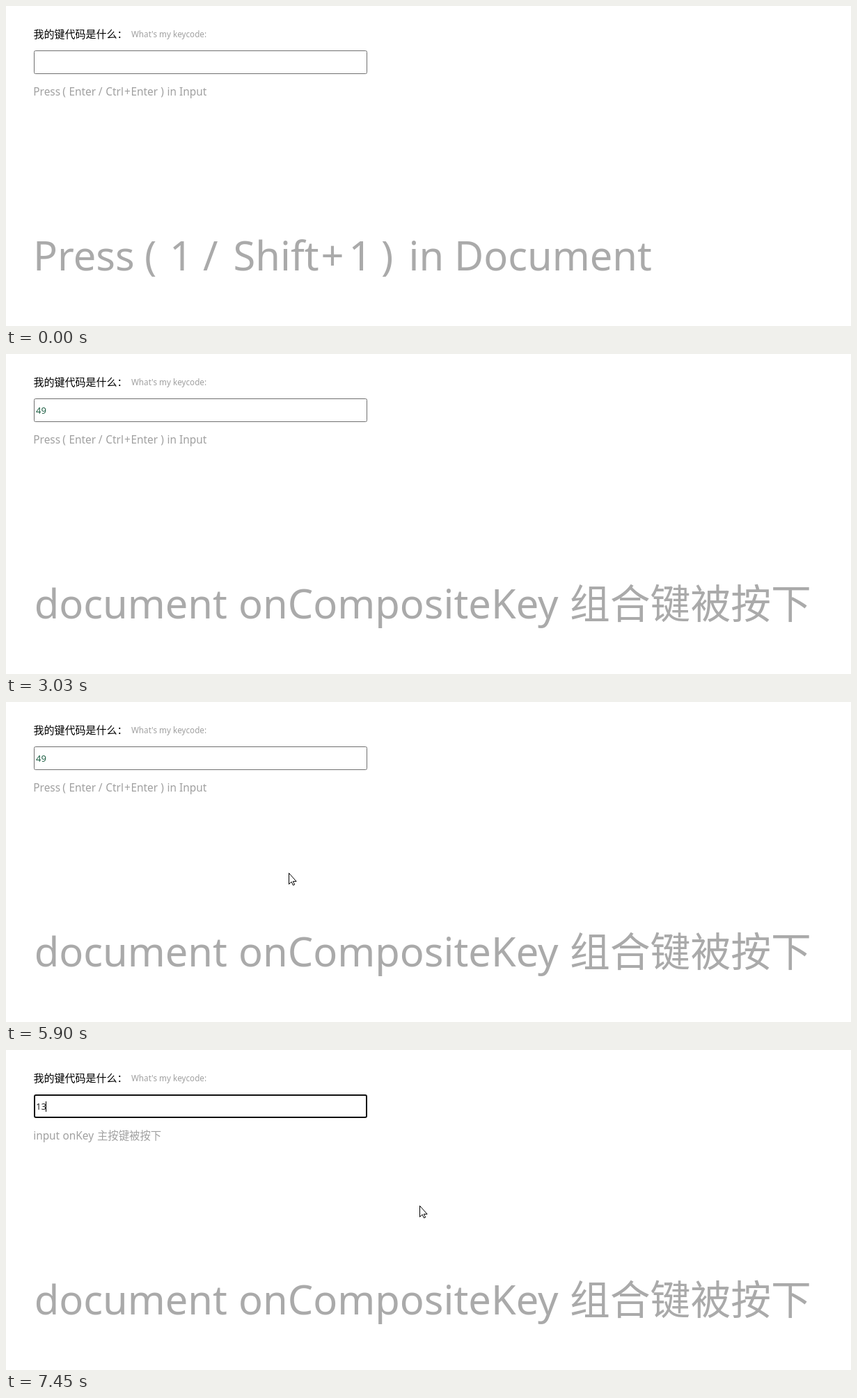
Write an HTML page that moves like this. It is 1214 px wide and 461 px high and loops after 8000 ms.

```html
<!DOCTYPE html>
<html lang="zh-CN">
<head>
<meta charset="utf-8">
<title>Keycode demo</title>
<style>
  html, body { margin: 0; width: 100%; height: 100%; overflow: hidden; background: #fff; }
  svg { display: block; width: 1214px; height: 461px; }
  text { font-family: "Noto Sans", "Noto Sans CJK SC", "Noto Sans CJK", sans-serif; fill: #aaa; }
  .small { fill: #a0a0a0; }
  .cjk { font-family: "Noto Sans CJK SC", "Noto Sans CJK", "Noto Sans", sans-serif; font-weight: 350; }
</style>
</head>
<body>
<svg viewBox="0 0 1214 461">
  <text class="cjk" x="39.5" y="45.5" font-size="15" style="fill:#000">我的键代码是什么：</text>
  <text class="small" x="180" y="45" font-size="11.7">What's my keycode:</text>
  <rect id="box" fill="#fff"/>
  <text id="value" x="43" y="86" font-size="13"></text>
  <path id="caret" d="M57.5 74v15" stroke="#000"/>
  <g id="hint"></g>
  <g id="title"></g>
  <path id="arrow" d="M.5.5V16.5L4.1 13l2.4 5 2.2-1-2.4-4.6h4.8z" fill="#fff" stroke="#000"/>
  <path id="beam" d="M-3-7.5h2.5l.5.5.5-.5H3M0-7V8M-3 8.5h2.5L0 8l.5.5H3" fill="none" stroke="#000"/>
</svg>
<script>
const LOOP = 8000;
const $ = id => document.getElementById(id);
const [box, value, caret, hint, title, arrow, beam] =
  ['box', 'value', 'caret', 'hint', 'title', 'arrow', 'beam'].map($);

// Each word starts at its own x; CJK words use their own font.
function addLine(parent, y, size, words) {
  const cells = words.map(([x, word]) => {
    const kind = [word.charCodeAt(0) > 0x2e80 && 'cjk', size < 20 && 'small'];
    return `<text x="${x}" y="${y}" font-size="${size * 0.98}" ` +
      `class="${kind.filter(Boolean).join(' ')}">${word}</text>`;
  });
  parent.insertAdjacentHTML('beforeend', `<g>${cells.join('')}</g>`);
}

addLine(hint, 129, 15.7, [[39.3, 'Press'], [81.3, '('], [90.5, 'Enter'], [132.8, '/'],
  [143.3, 'Ctrl'], [170, '+'], [179.5, 'Enter'], [222.3, ')'], [231.5, 'in'], [249, 'Input']]);
addLine(hint, 129, 15.7, [[39.2, 'input'], [81.5, 'onKey'], [131, '主按键被按下']]);

addLine(title, 381, 59, [[39, 'Press'], [199, '('], [235, '1'], [283, '/'],
  [326.5, 'Shift'], [452.5, '+'], [492.5, '1'], [539, ')'], [578.5, 'in'], [644, 'Document']]);
addLine(title, 381, 59, [[40.7, 'document'], [334, 'onKey'], [517, '主按键被按下']]);
addLine(title, 381, 59, [[40.7, 'document'], [334, 'onCompositeKey'], [810, '组合键被按下']]);

// Every step changes only the listed properties.
const steps = [
  [0, { value: '', ink: '#000', title: 0, hint: 0, border: 'idle', caret: false, pointer: null }],
  [930, { value: '49', ink: '#36503c', title: 1 }],
  [2870, { value: '16', ink: '#000' }],
  [3030, { value: '49', ink: '#1f6045', title: 2 }],
  [5670, { pointer: [502, 425] }],
  [5750, { pointer: [468, 352] }],
  [5830, { pointer: [406, 246] }],
  [5910, { pointer: [346, 158] }],
  [5980, { pointer: [312, 106] }],
  [6060, { pointer: [299, 85], border: 'hover' }],
  [6140, { border: 'focus', caret: true }],
  [6450, { pointer: [318, 92] }],
  [6530, { pointer: [434, 150] }],
  [6590, { pointer: [554, 206] }],
  [6670, { pointer: [594, 224], caret: false }],
  [7220, { caret: true }],
  [7450, { value: '13', ink: '#222', hint: 1 }]
];

const borders = {
  idle: ['#707070', 1],
  hover: ['#484848', 1],
  focus: ['#101010', 2]
};

const show = (el, on) => { el.style.display = on ? '' : 'none'; };
const pick = (group, n) => [...group.children].forEach((el, i) => show(el, i === n));

function place(el, [x, y], half) {
  el.setAttribute('transform', `translate(${x + half} ${y})`);
}

function drawBox([color, width]) {
  const attrs = {
    x: 40 + width / 2, y: 64 + width / 2, width: 479 - width, height: 34 - width,
    rx: 2, stroke: color, 'stroke-width': width
  };
  for (const name in attrs) box.setAttribute(name, attrs[name]);
}

function render(t) {
  const s = Object.assign({}, ...steps.filter(([at]) => at <= t).map(([, change]) => change));
  value.textContent = s.value;
  value.style.fill = s.ink;
  pick(title, s.title);
  pick(hint, s.hint);
  drawBox(borders[s.border]);
  show(caret, s.caret);

  const p = s.pointer;
  const inside = p && p[1] > 64 && p[1] < 98;
  show(arrow, p && !inside);
  show(beam, inside);
  if (p) {
    place(arrow, p, 0);
    place(beam, p, 0.5);
  }
}

const start = performance.now();
function tick() {
  render((performance.now() - start) % LOOP);
  requestAnimationFrame(tick);
}
tick();
</script>
</body>
</html>
```
